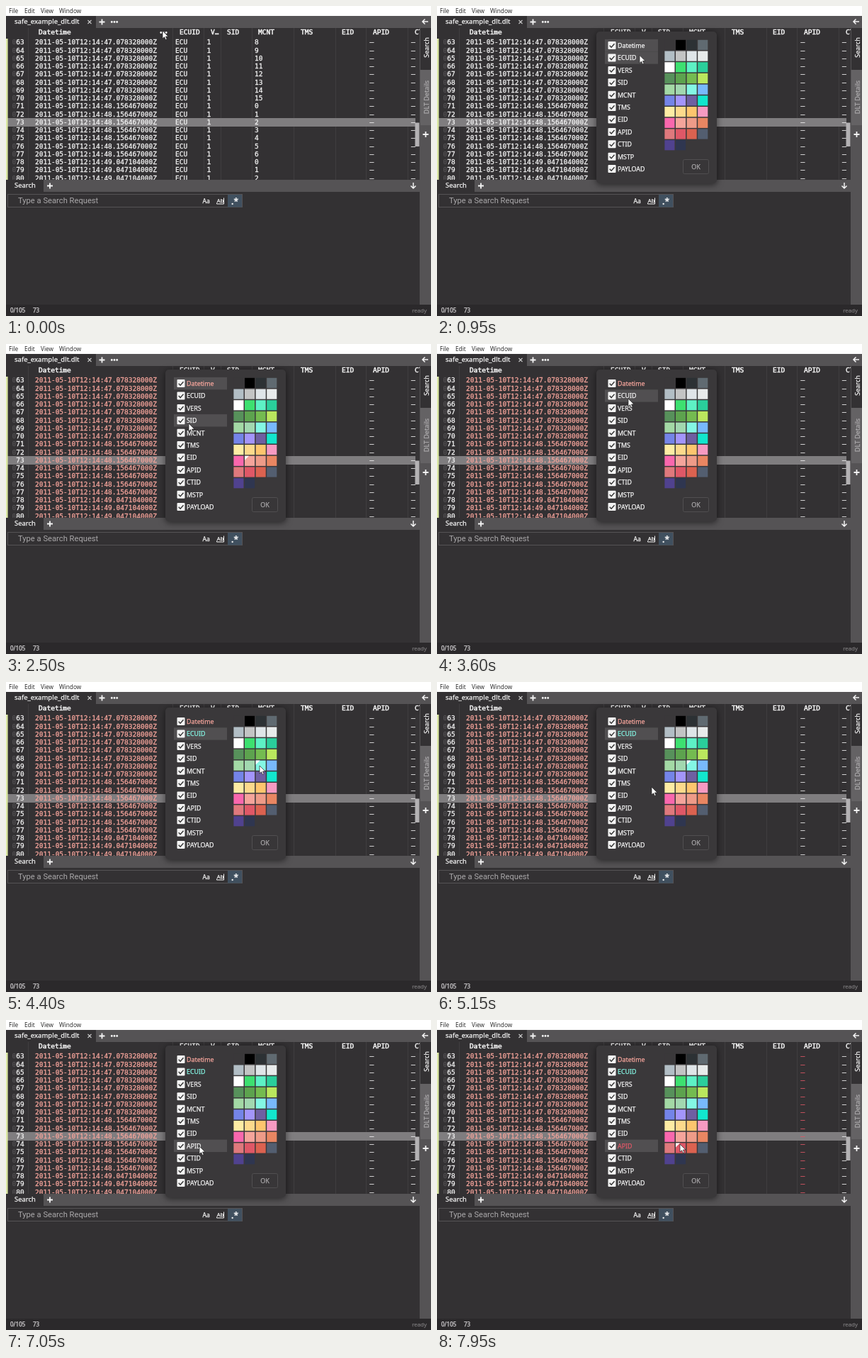
These frames come from a looping animation (600x437 px, 8 s). An HTML page:

```html
<!DOCTYPE html>
<html lang="en">
<head>
<meta charset="utf-8">
<title>Log viewer column colours</title>
<style>
  html, body { margin: 0; width: 100%; height: 100%; overflow: hidden; background: #333133; }
  svg { display: block; width: 600px; height: 437px; }
  text { white-space: pre; font-family: "Noto Sans", sans-serif; stroke-width: .25; }
  .mono { font: 9.53px "DejaVu Sans Mono", monospace; stroke-width: .3; }
  .heading { stroke-width: .5; }
  .menu { font: 8.3px "Open Sans", sans-serif; }
  .prompt { font: 11.2px Roboto, sans-serif; }
</style>
</head>
<body>
<svg id="stage" viewBox="0 0 600 437"></svg>
<script>
const PANEL = '#333133', BAR = '#555355', POPUP = '#3a383a', WHITE = '#f4f4f4';
const stage = document.getElementById('stage');

function add(parent, tag, attrs, content) {
  const el = document.createElementNS('http://www.w3.org/2000/svg', tag);
  for (const key in attrs) el.setAttribute(key, attrs[key]);
  if (content !== undefined) el.textContent = content;
  parent.append(el);
  return el;
}
// Text is outlined in its own colour to give it a medium weight.
const ink = colour => ({ fill: colour, stroke: colour });
const group = (parent, attrs = {}) => add(parent, 'g', attrs);
const rect = (parent, x, y, width, height, fill, more = {}) =>
  add(parent, 'rect', { x, y, width, height, fill, ...more });
const line = (parent, d, stroke, width, more = {}) =>
  add(parent, 'path', { d, stroke, 'stroke-width': width, fill: 'none', ...more });
const label = (parent, x, y, content, size, colour = WHITE, more = {}) =>
  add(parent, 'text', { x, y, ...ink(colour), 'font-size': size, ...more }, content);
const mono = (parent, x, y, content, more = {}) =>
  add(parent, 'text', { x, y, class: 'mono', ...more }, content);
const plus = (x, y) => line(stage, `M${x - 4} ${y}h8M${x} ${y - 4}v8`, WHITE, 1.8);
const dots = (parent, x, y) => {
  for (let i = -1; i < 2; i++) add(parent, 'circle', { cx: x + i * 3.7, cy: y, r: 1.4, fill: WHITE });
};

// Table
const ROW = 11.25, FIRST = 63, LAST = 80;
rect(stage, 0, 0, 600, 437, PANEL);
for (const x of [31, 235, 279, 303, 347, 406, 465, 508, 567])
  line(stage, `M${x}.5 31V245`, '#403e40', 1);
rect(stage, 0, 158, 578, 12, '#7f7d7f');
rect(stage, 0, 46, 2.6, 199, '#dbe8a5');

const headings = [[46, 'Datetime'], [245, 'ECUID'], [289, 'V…'], [312, 'SID'], [356, 'MCNT'],
  [416, 'TMS'], [474, 'EID'], [518, 'APID'], [577, 'CTID']];
for (const [x, name] of headings) mono(stage, x, 40.3, name, { ...ink(WHITE), class: 'mono heading' });
const headerDots = group(stage);
dots(headerDots, 222.5, 37.5);

const indexColumn = group(stage, ink(WHITE));
const plainColumns = group(stage, ink(WHITE));
const dateColumn = group(stage), ecuColumn = group(stage), apidColumn = group(stage);
const bursts = [[78, 78, '49.047104'], [71, 71, '48.156467'], [63, 55, '47.078328']];
for (let n = FIRST; n <= LAST; n++) {
  const y = 54.4 + (n - FIRST) * ROW;
  const [, origin, seconds] = bursts.find(([start]) => n >= start);
  if (n !== 73) mono(indexColumn, 8.5, y, '0', ink('#525052'));
  mono(indexColumn, 14.2, y, n);
  mono(dateColumn, 41, y, `2011-05-10T12:14:${seconds}000Z`);
  mono(ecuColumn, 239, y, 'ECU');
  mono(plainColumns, 283.5, y, '1');
  mono(plainColumns, 351, y, n - origin);
  mono(apidColumn, 513.5, y, '–');
  mono(plainColumns, 572, y, '–');
}
rect(stage, 578, 46, 6, 199, '#363436');
rect(stage, 577.5, 164.5, 6, 33.5, '#b4b2b4');

// Menu and tab bars
rect(stage, 0, 0, 600, 14, '#fff');
[[4, 'File'], [26, 'Edit'], [49, 'View'], [75, 'Window']].forEach(([x, name]) =>
  add(stage, 'text', { x, y: 10, class: 'menu', fill: '#222' }, name));
rect(stage, 127, 14, 473, 17, BAR);
label(stage, 12, 25.3, 'safe_example_dlt.dlt', 9.55, WHITE, { 'font-weight': 500 });
line(stage, 'M115.5 20l5 5m0 -5l-5 5', '#ccc', 1.1);
plus(135.5, 22.5);
dots(stage, 153, 22.5);

// Search panel
rect(stage, 0, 245, 584, 192, PANEL);
rect(stage, 53, 245, 531, 17, BAR);
label(stage, 12, 256.4, 'Search', 9.4, WHITE, { 'font-weight': 500 });
plus(62, 253.5);
line(stage, 'M575 249v8m-3.5 -3.5l3.5 3.5l3.5 -3.5', WHITE, 1.5);
rect(stage, 2.5, 265.5, 331, 18, PANEL, { stroke: '#555355' });
add(stage, 'text', { x: 17, y: 278, class: 'prompt', fill: '#aaa8aa' }, 'Type a Search Request');
label(stage, 277.5, 278, 'Aa', 8.5, WHITE, { 'font-weight': 500 });
label(stage, 297.8, 277, 'Ab', 7.6, WHITE, { 'font-weight': 500 });
line(stage, 'M307.5 270.5v8.5h-10v-1.5', WHITE, 1);
rect(stage, 313, 266, 20, 17.5, '#40505f');
label(stage, 318, 280, '.*', 12, WHITE, { 'font-weight': 700 });

// Side bar
rect(stage, 584, 14, 16, 408, BAR);
rect(stage, 585, 31, 15, 59, PANEL);
rect(stage, 585, 90, 15, 78, '#646264');
line(stage, 'M596 22h-8m3.5 -3.5l-3.5 3.5l3.5 3.5', WHITE, 1.5);
const sideTab = (y, name, colour) => label(stage, 0, 0, name, 9, colour,
  { 'text-anchor': 'middle', 'font-weight': 500, transform: `translate(596.5 ${y}) rotate(-90)` });
sideTab(58.5, 'Search', WHITE);
sideTab(128.5, 'DLT Details', '#aeacae');
plus(592.5, 181);

// Status bar
rect(stage, 0, 421, 600, 16, '#2b292b');
label(stage, 6, 431.5, '0/105', 8, '#d8d6d8');
label(stage, 38, 431.5, '73', 8, '#d8d6d8');
label(stage, 594, 431.5, 'ready', 7.9, '#747274', { 'text-anchor': 'end' });

// Column popup
const popup = group(stage, { style: 'filter: drop-shadow(0 2px 5px rgba(0,0,0,.55)); transform-origin: 310px 143px' });
rect(popup, 225, 36, 170, 214, POPUP, { rx: 5 });
const ITEM = 17.4, ITEM_TOP = 46.9;
const items = ['Datetime', 'ECUID', 'VERS', 'SID', 'MCNT', 'TMS', 'EID', 'APID', 'CTID', 'MSTP', 'PAYLOAD']
  .map((name, i) => {
    const y = ITEM_TOP + i * ITEM;
    const back = rect(popup, 237, y, 75, ITEM, '#514f51');
    rect(popup, 241.5, y + 3.2, 11, 11, WHITE, { rx: 1 });
    line(popup, `M243.7 ${y + 8.8}l2.4 2.5l4.4 -5`, '#333', 1.4);
    return { back, text: label(popup, 255, y + 12, name, 8.9, WHITE, { 'font-weight': 500 }) };
  });

const SWATCHES = [
  `${POPUP} #000000 #2c3134 #606a71`, '#b2bec5 #c3c4c4 #dfe5e8 #e8ebeb',
  '#ffffff #3de070 #5df1c5 #2ace9b', '#57915b #5da34e #74bb50 #bae75e',
  '#a3d9a5 #a2d8b0 #84f6e4 #78b9fc', '#7484e8 #a395fb #6e5fa2 #12e6cd',
  '#fdeca4 #fdda8c #fdc56e #f69ac2', '#f967ad #f5a49b #ee9b88 #e98662',
  '#df797d #df5867 #db6250 #535e70', '#50428f #2f3650'].map(row => row.split(' '));
const swatchAt = (row, col) => [321.4 + col * 15.6, 47.8 + row * 15.7];
SWATCHES.forEach((row, r) => row.forEach((fill, c) => {
  const [x, y] = swatchAt(r, c);
  rect(popup, x, y, 14.1, 14.2, fill);
}));
const marker = add(popup, 'path', { d: 'M0 0H6L0 6Z', fill: '#fff' });
rect(popup, 347.5, 216.5, 36, 20, '#383638', { rx: 2, stroke: '#514f51' });
label(popup, 365.5, 229.7, 'OK', 9, '#a8a6a8', { 'text-anchor': 'middle' });

const cursor = add(stage, 'path', {
  d: 'M0 0V11L2.6 8.7L4.3 12.5L6.1 11.7L4.5 8H8Z', fill: '#fff', stroke: '#222', 'stroke-width': 0.7 });

// Timeline: cursor stops are [ms, x, y]
const LOOP = 8000, OPEN_AT = 150;
const STOPS = [[0, 221, 35], [200, 221, 35], [650, 272, 57], [750, 272, 57], [950, 286, 69.5],
  [1650, 343, 165], [2000, 343, 165], [2500, 258, 112], [3050, 262, 84], [3600, 270, 77],
  [4200, 358, 118], [4600, 358, 118], [5150, 303, 148], [5700, 284, 138], [6150, 275, 130],
  [6700, 273, 178], [7050, 273, 178], [7650, 343, 175], [8000, 343, 175]];
const SELECTIONS = [[600, 0], [3400, 1], [6900, 7]];
const PAINTS = [
  { at: 1800, item: 0, row: 7, col: 1, column: dateColumn },
  { at: 4400, item: 1, row: 4, col: 2, column: ecuColumn },
  { at: 7800, item: 7, row: 8, col: 1, column: apidColumn }];

function cursorAt(t) {
  const i = STOPS.findIndex(([ms]) => ms > t);
  const [t0, x0, y0] = STOPS[i - 1], [t1, x1, y1] = STOPS[i];
  const k = (1 - Math.cos(Math.PI * (t - t0) / (t1 - t0))) / 2;
  return [x0 + (x1 - x0) * k, y0 + (y1 - y0) * k];
}

function setInk(el, colour) {
  el.setAttribute('fill', colour);
  el.setAttribute('stroke', colour);
}

function render(t) {
  const [x, y] = cursorAt(t);
  cursor.setAttribute('transform', `translate(${x} ${y})`);

  const shown = Math.min(1, Math.max(0, (t - OPEN_AT) / 150));
  popup.style.opacity = shown;
  popup.style.transform = `scale(${0.7 + 0.3 * shown})`;
  headerDots.style.opacity = t < OPEN_AT ? 1 : 0;

  const hovered = x > 237 && x < 302 ? Math.floor((y - ITEM_TOP) / ITEM) : -1;
  const selected = SELECTIONS.filter(([ms]) => t >= ms).pop()?.[1];
  items.forEach(({ back }, i) => back.style.opacity = i === hovered || i === selected ? 1 : 0);

  let marked = false;
  for (const { at, item, row, col, column } of PAINTS) {
    const colour = t >= at ? SWATCHES[row][col] : WHITE;
    setInk(column, colour);
    setInk(items[item].text, colour);
    if (t >= at && item === selected) {
      marker.setAttribute('transform', `translate(${swatchAt(row, col)})`);
      marked = true;
    }
  }
  marker.style.opacity = marked ? 1 : 0;
}

const start = performance.now();
function tick() {
  render((performance.now() - start) % LOOP);
  requestAnimationFrame(tick);
}
tick();
</script>
</body>
</html>
```
